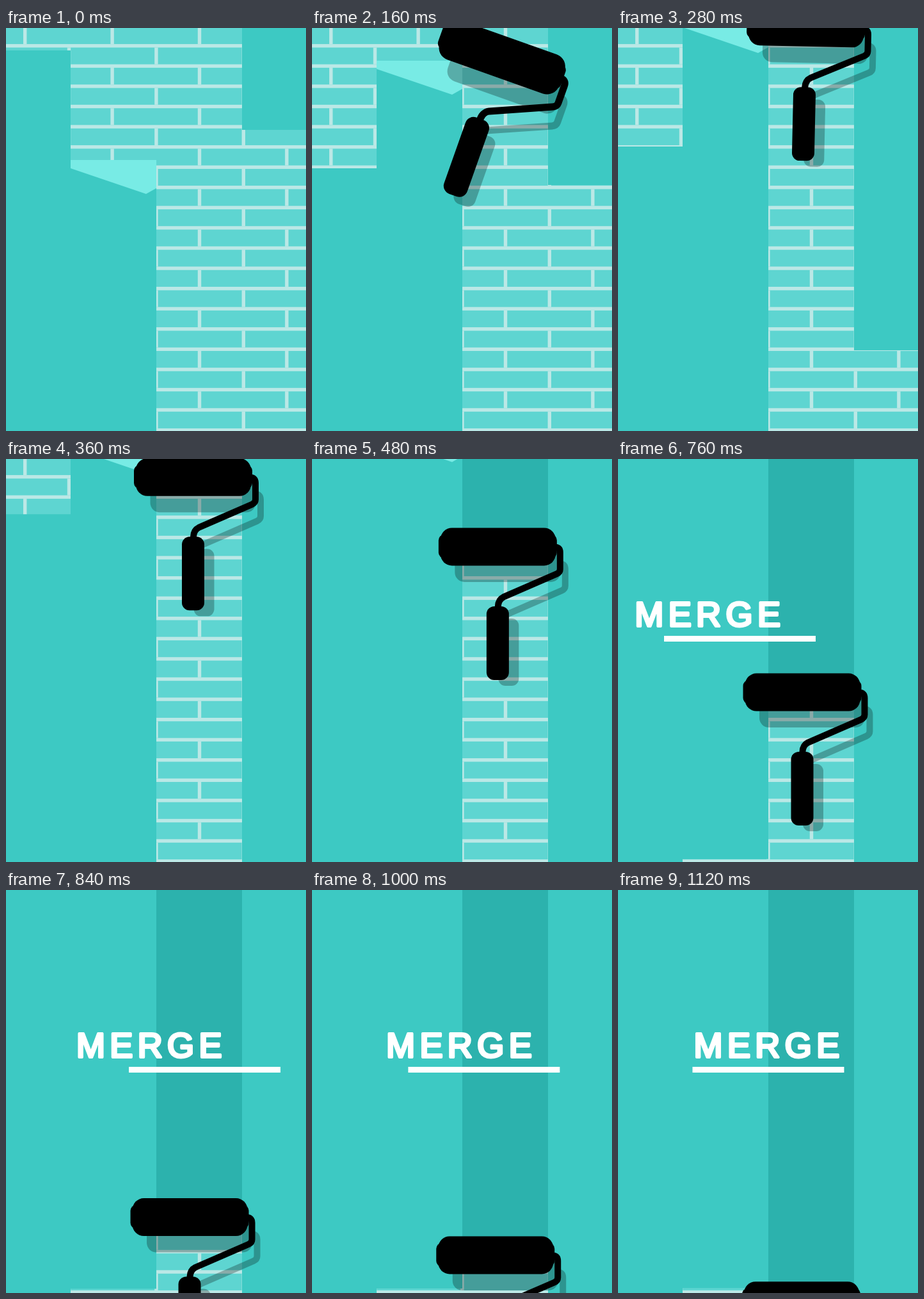
An HTML page with a canvas for the animation above (1.16 s loop, 469x629 px).

```html
<!DOCTYPE html>
<html lang="en">
<head>
<meta charset="utf-8">
<title>Merge</title>
<style>
  html, body { margin: 0; width: 100%; height: 100%; overflow: hidden; background: #3dc9c3; }
  canvas { display: block; }
</style>
</head>
<body>
<canvas id="stage" width="469" height="629"></canvas>
<script>
const W = 469, H = 629, LOOP = 1160;
const COLOR = {
  paper: '#3dc9c3', brick: '#5ed5d1', mortar: '#bbe8e6',
  fold: '#78ebe5', paint: '#2cb2ad'
};
// Times at which the picture moves on to its next step.
const STEPS = [0, 80, 160, 200, 280, 360, 400, 480, 600, 680, 760, 800, 840, 1000, 1080, 1120];
const ROLL_STEP = 4, TITLE_STEP = 10;

// Left sheet drops and springs back, the right one accelerates down, the folded one settles upwards.
const leftEdge = s => 35 + 146.5 * s - 27.25 * s * s;
const rightEdge = s => 159 + 21.5 * s * s;
const foldTip = s => 267 * 0.6475 ** s - 8;

// The roller swings in, larger and tilted, then eases down the wall.
function rollerPose(s) {
  const swing = Math.max(0, ROLL_STEP - s) ** 2;
  const d = s - 9.5;
  return {
    x: 286.5 + 0.06 * (15 - s) ** 2,
    y: swing ? 11.3 * swing : 324.7 + d * (79 - 0.156 * d - 0.684 * d * d),
    angle: 1.25 * Math.max(0, ROLL_STEP + 1 - s) ** 2.5 * Math.PI / 180,
    scale: 1 + 0.025 * swing
  };
}

// The title eases into place; its bar overshoots first. n counts steps since they appeared.
const titleLeft = n => 121 - 92.5 * 0.31 ** n;
const barLeft = n => 109 + (407 * n - 37) * 0.327 ** n;

const ctx = document.getElementById('stage').getContext('2d');

function rect(color, x, y, w, h) {
  ctx.fillStyle = color;
  ctx.fillRect(x, y, w, h);
}

function pill(c, x, y, w, h, r) {
  c.beginPath();
  c.roundRect(x, y, w, h, r);
  c.fill();
}

function drawWall() {
  const pitchX = 136.4, pitchY = 31.57, gap = 5.4;
  rect(COLOR.brick, 0, 0, W, H);
  for (let row = 0; row < 20; row++) {
    const y = 25.1 + row * pitchY;
    rect(COLOR.mortar, 0, y, W, gap);
    for (let x = row % 2 ? 95.8 : 27; x < W; x += pitchX)
      rect(COLOR.mortar, x, y - pitchY + gap, gap, pitchY - gap);
  }
}

function drawPaper(step) {
  const tip = foldTip(step);
  rect(COLOR.paper, 0, Math.max(0, leftEdge(step)), 101, H);
  rect(COLOR.paper, 369, 0, 100, rightEdge(step));
  rect(COLOR.paper, 101, tip - 53, 134, H + 53);
  ctx.fillStyle = COLOR.fold;
  ctx.beginPath();
  for (const [x, dy] of [[101, -53], [235, -53], [235, -9], [219, 0], [101, -40]])
    ctx.lineTo(x, tip + dy);
  ctx.fill();
}

function drawArm(c, dx, dy) {
  c.lineWidth = 10;
  c.lineJoin = c.lineCap = 'round';
  c.save();
  c.translate(dx, dy);
  c.beginPath();
  c.moveTo(88, 0.5);
  c.quadraticCurveTo(97.5, 0, 97.5, 9);
  c.lineTo(97.5, 35);
  c.quadraticCurveTo(97.5, 40, 92, 42.5);
  c.lineTo(9, 78.5);
  c.quadraticCurveTo(1, 82.5, 0.5, 93);
  c.stroke();
  c.restore();
}

function applyPose(c, { x, y, angle, scale }) {
  c.translate(x, y);
  c.rotate(angle);
  c.scale(scale, scale);
}

// The shadow is built opaque on its own layer so overlaps stay even.
const shade = document.createElement('canvas').getContext('2d');
shade.canvas.width = W;
shade.canvas.height = H;

function drawRoller(pose) {
  shade.clearRect(0, 0, W, H);
  shade.save();
  applyPose(shade, pose);
  pill(shade, -67, 0, 165, 55, 15);
  drawArm(shade, 8, 26);
  pill(shade, 1, 112, 32, 105, 11);
  shade.restore();
  ctx.globalAlpha = 0.26;
  ctx.drawImage(shade.canvas, 0, 0);
  ctx.globalAlpha = 1;

  ctx.save();
  applyPose(ctx, pose);
  ctx.fillStyle = ctx.strokeStyle = '#000';
  pill(ctx, -89.5, -29.5, 180, 59, 18);
  pill(ctx, -92.5, -19, 185, 37, 9);
  drawArm(ctx, 0, 0);
  pill(ctx, -17.5, 93, 35, 115, 12);
  ctx.restore();
}

function drawTitle(n) {
  ctx.font = '54px "Liberation Sans", Arial, sans-serif';
  ctx.letterSpacing = '7.4px';
  ctx.fillStyle = ctx.strokeStyle = '#fff';
  ctx.lineWidth = 4;
  ctx.lineJoin = 'round';
  const x = titleLeft(n) - 2.2;
  ctx.fillText('MERGE', x, 261);
  ctx.strokeText('MERGE', x, 261);
  rect('#fff', barLeft(n), 276, 237, 9);
}

function draw(now) {
  const time = now % LOOP;
  const step = STEPS.filter(t => t <= time).length - 1;
  const pose = rollerPose(step);
  drawWall();
  drawPaper(step);
  if (step >= ROLL_STEP) rect(COLOR.paint, 235, 0, 134, Math.max(0, pose.y));
  if (step > 0) drawRoller(pose);
  if (step >= TITLE_STEP) drawTitle(step - TITLE_STEP);
}

const start = performance.now();
function tick() {
  draw(performance.now() - start);
  requestAnimationFrame(tick);
}
tick();
</script>
</body>
</html>
```
